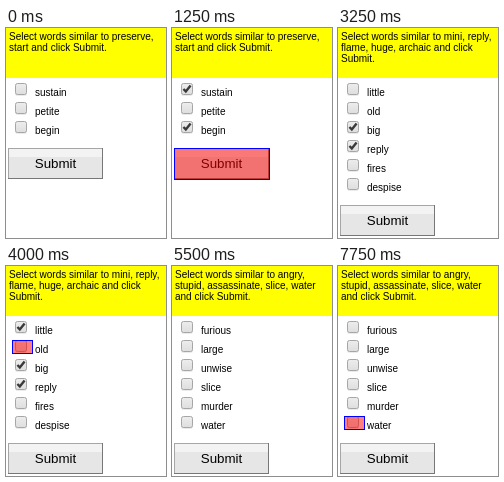
These frames come from a looping animation (160 by 210 pixels, 8000 ms). An HTML page:

```html
<!DOCTYPE html>
<html lang="en">
<head>
<meta charset="utf-8">
<title>Similar words</title>
<style>
html, body { margin: 0; width: 100%; height: 100%; overflow: hidden; background: #fff; }
svg { display: block; width: 160px; height: 210px; }
text { font: 10px "Liberation Sans", Arial, sans-serif; fill: #000; }
.submit { font-size: 13.333px; text-anchor: middle; }
</style>
</head>
<body>
<svg id="stage" viewBox="0 0 160 210">
  <defs>
    <linearGradient id="box" x2="0" y2="1">
      <stop stop-color="#ededed"/>
      <stop offset="1" stop-color="#dedede"/>
    </linearGradient>
  </defs>
  <rect width="160" height="50" fill="#ff0"/>
  <g id="page"></g>
</svg>
<script>
const LOOP = 8000, STEP = 250;
const ROW_TOP = 52, ROW_HEIGHT = 19;

// clicks: rows toggled in turn; the button is pressed after the last one
const pages = [
  { start: 0,
    query: ["Select words similar to preserve,", "start and click Submit."],
    words: ["sustain", "petite", "begin"],
    clicks: [0, 2] },
  { start: 2250,
    query: ["Select words similar to mini, reply,", "flame, huge, archaic and click", "Submit."],
    words: ["little", "old", "big", "reply", "fires", "despise"],
    clicks: [2, 3, 0, 1] },
  { start: 5500,
    query: ["Select words similar to angry,", "stupid, assassinate, slice, water", "and click Submit."],
    words: ["furious", "large", "unwise", "slice", "murder", "water"],
    clicks: [5, 5, 5, 5, 5] }
];

const rect = (x, y, w, h, fill) =>
  `<rect x="${x}" y="${y}" width="${w}" height="${h}" fill="${fill}"/>`;

const label = (x, y, str, cls = "") => `<text class="${cls}" x="${x}" y="${y}">${str}</text>`;

const rowTop = i => ROW_TOP + i * ROW_HEIGHT;

function checkbox(y, on) {
  const tick = on
    ? `<path d="M11.4 ${y + 6}l2.4 2.4l4.8-6" fill="none" stroke="#000" stroke-opacity=".75" stroke-width="2.4"/>`
    : "";
  return `<rect x="9" y="${y + 1}" width="12" height="12" rx="2" fill="#000" fill-opacity=".08"/>
    <rect x="9.5" y="${y + .5}" width="11" height="11" rx="2" fill="url(#box)" stroke="#a6a6a6"/>${tick}`;
}

function button(y) {
  return rect(2, y, 95, 31, "#777") + rect(2, y, 94, 30, "#a6a6a6") +
    rect(3, y + 1, 93, 8, "#f3f3f3") + rect(3, y + 9, 93, 21, "#e6e6e6") +
    label(49.5, y + 20, "Submit", "submit");
}

function highlight(x, y, w, h) {
  return `<rect x="${x + .5}" y="${y + .5}" width="${w - 1}" height="${h - 1}"
    fill="#f00" fill-opacity=".5" stroke="#00f"/>`;
}

function render({ query, words, clicks }, step) {
  const pressed = step > 2 * clicks.length;
  const done = clicks.slice(0, step >> 1);
  const buttonTop = rowTop(words.length) + 11;
  let out = query.map((line, i) => label(3, 12 + 11 * i, line)).join("");

  words.forEach((word, i) => {
    const on = done.filter(c => c === i).length % 2 === 1;
    out += checkbox(rowTop(i) + 3, on) + label(29, rowTop(i) + 16, word);
  });
  out += button(buttonTop);

  if (pressed) out += highlight(2, buttonTop, 96, 32);
  else if (step % 2) out += highlight(6, rowTop(clicks[step >> 1]) + 3, 21, 14);
  return out;
}

const target = document.getElementById("page");
let shown = "";

function draw(now) {
  const t = now % LOOP;
  const page = pages.filter(p => p.start <= t).pop();
  const markup = render(page, Math.floor((t - page.start) / STEP));
  if (markup !== shown) target.innerHTML = shown = markup;
}

let origin = null;
function tick(now) {
  origin ??= now;
  draw(Math.max(0, now - origin));
  requestAnimationFrame(tick);
}
draw(0);
requestAnimationFrame(tick);
</script>
</body>
</html>
```
